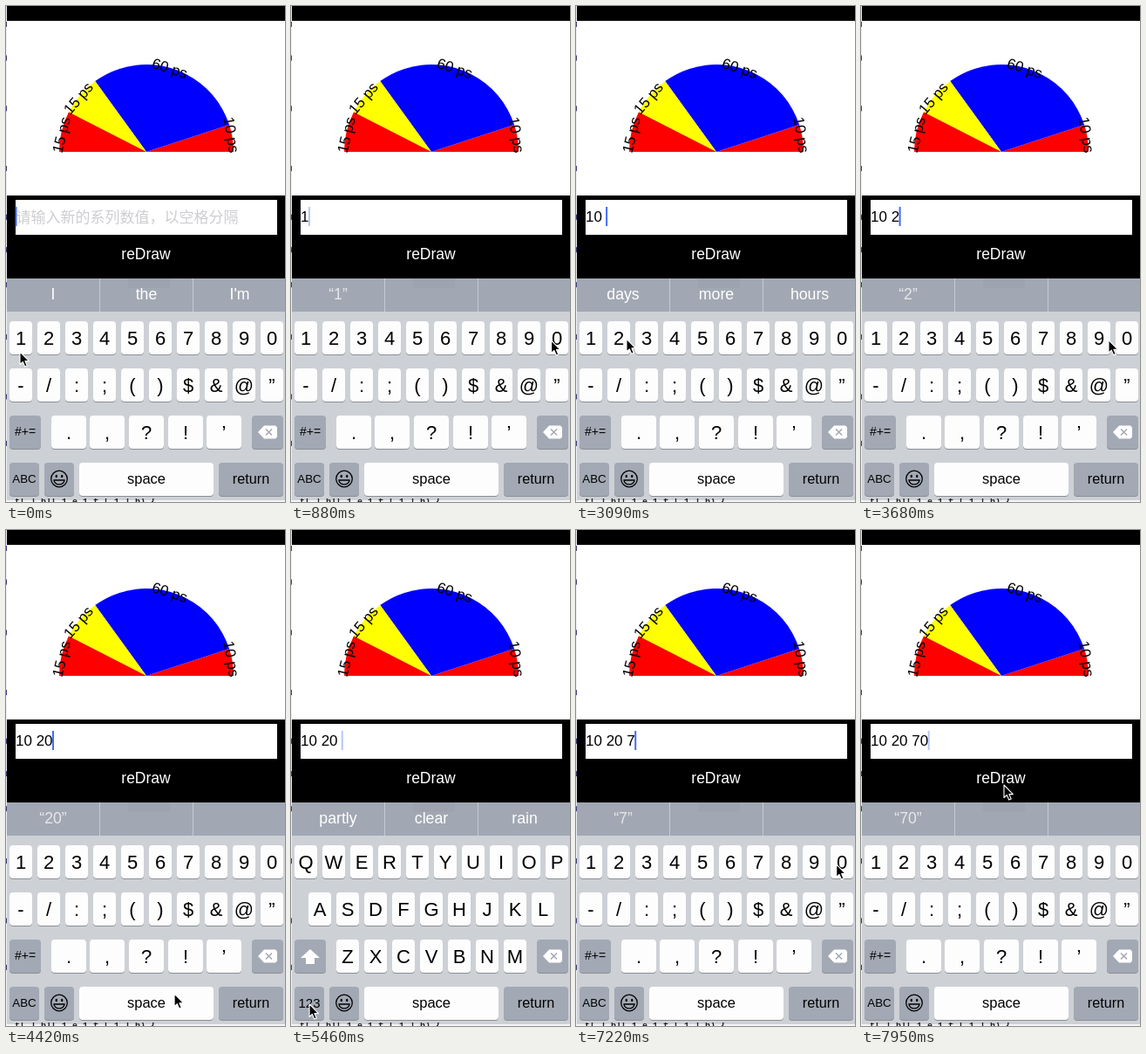
Write an HTML page with a canvas that moves like this. It is 320 px wide and 568 px high and loops after 8000 ms.

```html
<!DOCTYPE html>
<html lang="en">
<head>
<meta charset="utf-8">
<title>Pie chart input</title>
<style>
html, body { margin: 0; width: 100%; height: 100%; overflow: hidden; background: #000; }
canvas { display: block; width: 320px; height: 568px; }
</style>
</head>
<body>
<canvas id="stage"></canvas>
<script>
const W = 320, H = 568, LOOP = 8000, STEP = 147.3;
const SANS = '"Liberation Sans", Arial, sans-serif';
const CJK = '"Noto Sans CJK SC", "Noto Sans CJK", sans-serif';
const LIGHT = '#fdfdfe', GREY = '#a2a9b4', BOARD = '#cdd1d6';

const canvas = document.getElementById('stage');
const ctx = canvas.getContext('2d');
const ratio = window.devicePixelRatio || 1;
canvas.width = W * ratio;
canvas.height = H * ratio;

// Every tap: step, key, pointer place. Text, hints and layout follow from it.
const taps = [
  [0, '', 16, 396], [2, '1', 16, 396], [7, '0', 299, 383], [12, ' ', 186, 541],
  [18, '123', 19, 545], [23, '2', 59, 377], [27, '0', 299, 383], [33, ' ', 186, 541],
  [39, '123', 19, 543], [46, '7', 217, 379], [50, '0', 299, 383], [54, '', 164, 292]
];
const nextWords = [['days', 'more', 'hours'], ['partly', 'clear', 'rain']];

function stateAt(n) {
  const s = { text: '', typedAt: 0, letters: false, words: ['I', 'the', "I'm"], old: '' };
  let spaces = 0;
  for (const [at, key] of taps) {
    if (at > n) break;
    if (key === '123') s.letters = false;
    else if (key) {
      s.text += key;
      s.typedAt = at;
      s.old = s.words[0];
      if (key === ' ') {
        s.letters = true;
        s.words = nextWords[spaces++];
      } else s.words = [`“${s.text.split(' ').pop()}”`];
    }
  }
  return s;
}

function rect(x, y, w, h, color) {
  ctx.fillStyle = color;
  ctx.fillRect(x, y, w, h);
}

function text(s, x, y, size, color = '#000', align = 'center', family = SANS, weight = 400) {
  ctx.font = `${weight} ${size}px ${family}`;
  ctx.textAlign = align;
  ctx.fillStyle = color;
  ctx.fillText(s, x, y);
}

function shape(d, color) {
  ctx.fillStyle = color;
  ctx.fill(new Path2D(d));
}

function key(x, y, w, label, size = 22, color = LIGHT) {
  for (const [dy, fill] of [[1, '#8b8f95'], [0, color]]) {
    ctx.beginPath();
    ctx.roundRect(x, y + dy, w, 38, 4);
    ctx.fillStyle = fill;
    ctx.fill();
  }
  text(label, x + w / 2, y + 16.5 + size * 0.47, size);
}

function row(labels, x, y, w = 26, gap = 32) {
  [...labels].forEach((c, i) => key(Math.floor(x + i * gap), y, w, c));
}

function drawPie() {
  const cx = 161, cy = 167, r = 100;
  const parts = [[10, '#f00'], [60, '#00f'], [15, '#ff0'], [15, '#f00']];
  const labels = [];
  let sum = 0;
  for (const [value, color] of parts) {
    const from = sum * Math.PI / 100;
    const to = (sum += value) * Math.PI / 100;
    ctx.beginPath();
    ctx.moveTo(cx, cy);
    ctx.arc(cx, cy, r, -from, -to, true);
    ctx.fillStyle = color;
    ctx.fill();
    labels.push([value + ' ps', (from + to) / 2]);
  }
  for (const [label, a] of labels) {
    ctx.save();
    ctx.translate(cx + r * Math.cos(a), cy - r * Math.sin(a));
    ctx.rotate(Math.PI / 2 - a);
    text(label, -4, 6.5, 17);
    ctx.restore();
  }
}

function drawField(n, s) {
  rect(11, 222, 300, 40, '#fff');
  if (s.text) text(s.text, 11, 247, 17, '#000', 'left');
  else text('请输入新的系列数值，以空格分隔', 11.5, 248, 17, '#cdcdd2', 'left', CJK, 300);

  // Blink with a one-second period, restarted by every typed key
  const phase = (n - s.typedAt) * STEP / 1000 % 1;
  const alpha = phase > 0.92 ? 1 : Math.min(1, Math.max(0, (0.62 - phase) / 0.08));
  ctx.font = `17px ${SANS}`;
  ctx.globalAlpha = alpha;
  rect(10.5 + ctx.measureText(s.text).width, 230, 2, 22, '#426bf2');
  ctx.globalAlpha = 1;
}

function fade(x0, x1, from, to) {
  const g = ctx.createLinearGradient(x0, 0, x1, 0);
  g.addColorStop(0, `rgba(255,255,255,${from})`);
  g.addColorStop(1, `rgba(255,255,255,${to})`);
  return g;
}

function drawHints(n, s) {
  rect(1, 312, 319, 38, '#a1a8b3');
  rect(140, 312, 48, 11, 'rgba(0,0,0,.025)');
  for (const x of [107, 214]) rect(x, 312, 1, 38, '#c6cbd2');
  const several = s.words.length > 1;
  const swap = several && n > 0 && n === s.typedAt;
  s.words.forEach((word, k) => {
    const x = 54 + 107 * k;
    const color = swap ? fade(x - 20, x + 2, 0.5, 0) : `rgba(255,255,255,${several ? 1 : 0.72})`;
    text(word, x, 335.5, 17.7, color);
  });
  if (swap) text(s.old, 54, 335.5, 17.7, fade(41, 47, 0, 1));
}

function drawDelete() {
  shape('M289 488l7-7.5h13l2 2v11l-2 2h-13z', '#fff');
  ctx.strokeStyle = GREY;
  ctx.lineWidth = 1.5;
  ctx.stroke(new Path2D('M298 484.5l7 7m0-7l-7 7'));
}

function drawSmiley() {
  const x = 61, y = 541.5;
  ctx.strokeStyle = ctx.fillStyle = '#000';
  ctx.lineWidth = 1.3;
  ctx.beginPath();
  ctx.arc(x, y, 9.3, 0, 7);
  ctx.stroke();
  for (const dx of [-3.2, 3.2]) {
    ctx.beginPath();
    ctx.ellipse(x + dx, y - 3, 1.2, 1.8, 0, 0, 7);
    ctx.fill();
  }
  ctx.beginPath();
  ctx.ellipse(x, y + 1.5, 6, 4.8, 0, 0, Math.PI);
  ctx.closePath();
  ctx.stroke();
}

function drawKeyboard(letters) {
  rect(1, 350, 319, 216, BOARD);
  if (letters) {
    row('QWERTYUIOP', 4, 361);
    row('ASDFGHJKL', 20, 415);
    row('ZXCVBNM', 52, 469);
  } else {
    row('1234567890', 4, 361);
    row('-/:;()$&@”', 4, 415);
    row('.,?!’', 52, 469, 40, 44.7);
  }
  key(4, 469, 36, letters ? '' : '#+=', 14, GREY);
  if (letters) shape('M22 480l11 10h-6v7h-10v-7h-6z', '#fff');
  key(282, 469, 36, '', 14, GREY);
  drawDelete();
  key(4, 523, 34, letters ? '123' : 'ABC', letters ? 15 : 13.3, GREY);
  key(44, 523, 34, '', 14, GREY);
  drawSmiley();
  key(84, 523, 154, 'space', 16.5);
  key(244, 523, 74, 'return', 16.2, GREY);
}

// Slivers of the window behind
function drawEdges() {
  rect(0, 0, 1, H, '#eceef2');
  for (let i = 0; i < 10; i++) rect(0, 18 + i * 52 + 14 * Math.sin(i * 5), 1, 6, '#3c3c78');
  rect(0, 566, W, 2, '#f4f5f7');
  ctx.save();
  ctx.beginPath();
  ctx.rect(0, 564, W, 4);
  ctx.clip();
  text('t[ ] bl[ 1 e 1 f [ 1 ] h) {', 10, 571, 10, '#222', 'left', '"Liberation Mono", monospace', 700);
  ctx.restore();
}

// Quick start, slow arrival between two taps
function drawPointer(n) {
  const i = Math.max(1, taps.findIndex(tap => tap[0] >= n));
  const [n0, , x0, y0] = taps[i - 1];
  const [n1, , x1, y1] = taps[i];
  const e = 1 - (1 - (n - n0) / (n1 - n0)) ** 4;
  ctx.save();
  ctx.translate(x0 + (x1 - x0) * e, y0 + (y1 - y0) * e);
  const arrow = 'M0 0v14.5l3.3-3 2.4 5.5 2.5-1-2.3-5.4h4.5z';
  shape(arrow, '#000');
  ctx.strokeStyle = '#fff';
  ctx.lineWidth = 1.1;
  ctx.lineJoin = 'round';
  ctx.stroke(new Path2D(arrow));
  ctx.restore();
}

function draw(ms) {
  const n = Math.floor((ms + 8) / STEP);
  const s = stateAt(n);
  ctx.setTransform(ratio, 0, 0, ratio, 0, 0);
  rect(0, 0, W, H, '#000');
  rect(1, 17, 319, 200, '#fff');
  drawPie();
  drawField(n, s);
  text('reDraw', 160.5, 290, 17.5, '#fff');
  drawHints(n, s);
  drawKeyboard(s.letters);
  drawEdges();
  drawPointer(n);
}

const start = performance.now();
function tick() {
  draw((performance.now() - start) % LOOP);
  requestAnimationFrame(tick);
}
tick();
</script>
</body>
</html>
```
